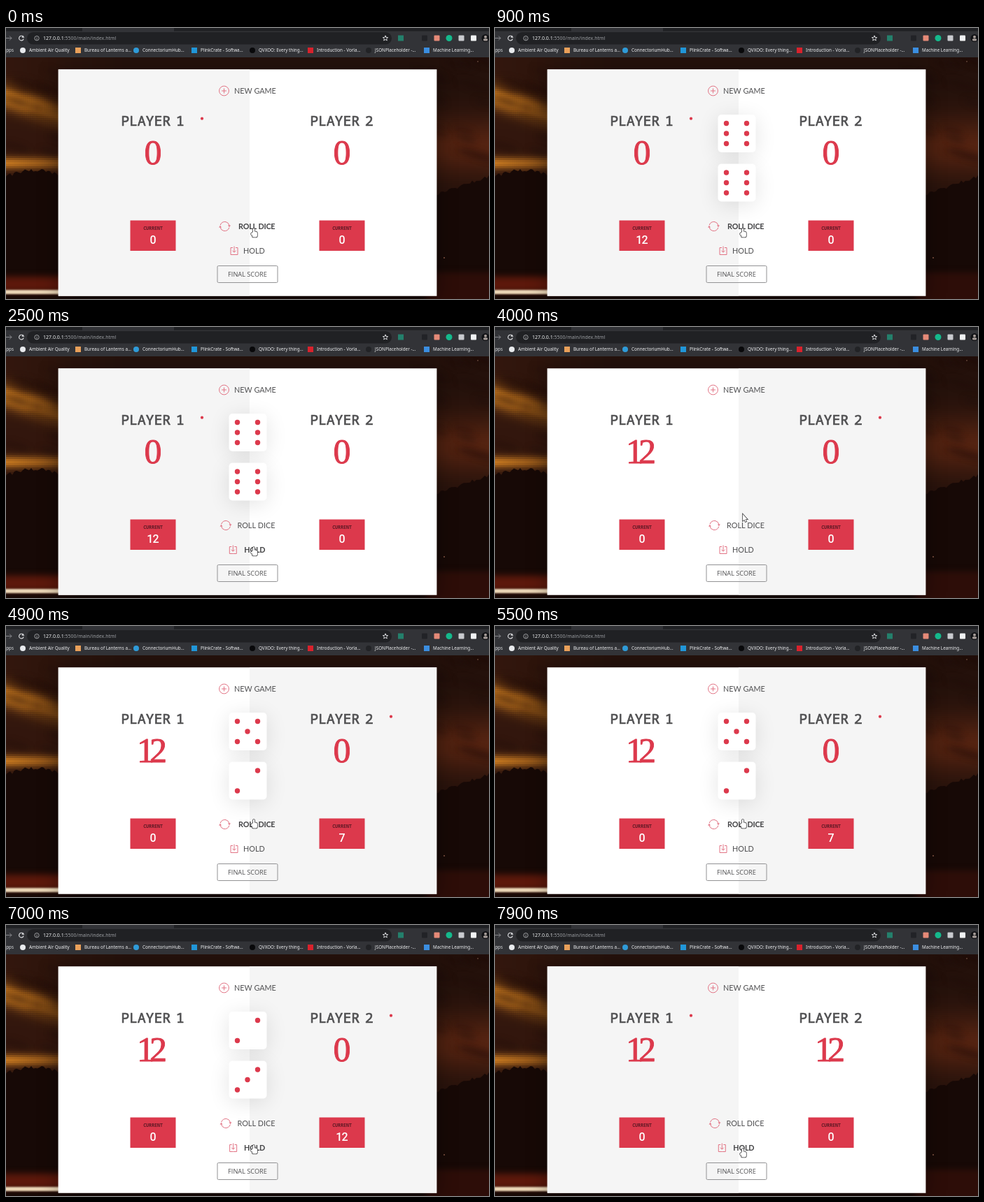
These frames come from a looping animation (690x388 px, 8 s). An HTML page with a canvas:

```html
<!DOCTYPE html>
<html lang="en">
<head>
<meta charset="utf-8">
<title>Dice game</title>
<style>
html, body { margin: 0; width: 100%; height: 100%; overflow: hidden; background: #140706; }
canvas { display: block; width: 690px; height: 388px; }
</style>
</head>
<body>
<canvas id="stage" width="690" height="388"></canvas>
<script>
const W = 690, H = 388, LOOP = 8000;
const RED = '#dc394c', TINT = '#e27384', INK = '#505052', PALE = '#dfe0e3';
const SANS = '"Noto Sans", "Open Sans", sans-serif';
const MONO = '"Noto Sans Mono", "DejaVu Sans Mono", monospace';
const stage = document.getElementById('stage').getContext('2d');
let c = stage;

function text(s, x, y, font, color, align = 'left', spacing = 0) {
  c.font = font;
  c.fillStyle = color;
  c.textAlign = align;
  c.letterSpacing = spacing + 'px';
  c.fillText(s, x + (align === 'center' ? spacing / 2 : 0), y);
}
// Centred text made heavier by an outline
function heavyText(s, x, y, font, color, weight, spacing) {
  text(s, x, y, font, color, 'center', spacing);
  c.strokeStyle = color;
  c.lineWidth = weight;
  c.lineJoin = 'round';
  c.strokeText(s, x + spacing / 2, y);
  c.lineJoin = 'miter';
}
function rect(x, y, w, h, color, r = 0) {
  c.fillStyle = color;
  c.beginPath();
  c.roundRect(x, y, w, h, r);
  c.fill();
}
function disc(x, y, r, color) {
  c.fillStyle = color;
  c.beginPath();
  c.arc(x, y, r, 0, 7);
  c.fill();
}
function line(points, color, width = 1) {
  c.strokeStyle = color;
  c.lineWidth = width;
  c.beginPath();
  points.forEach(([x, y]) => c.lineTo(x, y));
  c.stroke();
}
function arc(x, y, r, from, to, color, width = 1) {
  c.strokeStyle = color;
  c.lineWidth = width;
  c.beginPath();
  c.arc(x, y, r, from, to);
  c.stroke();
}
function triangle(x, y, w, h, color) {
  c.fillStyle = color;
  c.beginPath();
  c.moveTo(x - w, y);
  c.lineTo(x + w, y);
  c.lineTo(x, y + h);
  c.fill();
}
function blurred(px, paint) {
  c.save();
  c.filter = `blur(${px}px)`;
  paint();
  c.restore();
}
function shadowed(alpha, blur, paint) {
  c.save();
  c.shadowColor = `rgba(0,0,0,${alpha})`;
  c.shadowBlur = blur;
  c.shadowOffsetY = 5;
  paint();
  c.restore();
}
function seeded(n) {
  return () => (n = (n * 16807) % 2147483647) / 2147483647;
}
const bump = (v, mid, width) => Math.exp(-(((v - mid) / width) ** 2));

// Sunset: amber bands on the left fading to a dull red glow on the right
function skyColor(x, y) {
  const near = Math.max(0, 1 - x / 170), far = x / W;
  const amber = near * (bump(y, 97 + x * 0.35, 17) + 0.9 * bump(y, 192, 9));
  const glow = 0.3 * near + far * bump(y, 168, 42);
  const mix = [36, 17, 11].map((v, k) => v + [158, 104, 20][k] * amber + [48, 18, 6][k] * glow);
  return `rgb(${mix.map(Math.round)})`;
}
function scenery() {
  const rnd = seeded(41);
  for (let x = 0; x < W; x += 3) {
    for (let y = 42; y < 260; y += 3) {
      c.fillStyle = skyColor(x, y);
      c.fillRect(x, y, 3, 3);
    }
  }
  blurred(4, () => {
    for (let i = 0; i < 30; i++) {
      c.fillStyle = 'rgba(28,12,9,.32)';
      c.beginPath();
      c.ellipse((i % 2) * 610 + rnd() * 80, 45 + rnd() * 140, 10 + rnd() * 22, 2 + rnd() * 4, 0.3, 0, 7);
      c.fill();
    }
  });
  c.fillStyle = '#170906';
  c.beginPath();
  c.moveTo(0, H);
  for (let x = 0; x <= W; x += 3) {
    const ridge = x < 345 ? 206 + 5 * Math.cos((x - 40) / 18 + 3.1) : 236 - (x - 615) * 0.35;
    c.lineTo(x, ridge + rnd() * 5);
  }
  c.lineTo(W, H);
  c.fill();
  // Light trails on the road
  blurred(5, () => rect(-10, 356, 110, 22, 'rgba(140,35,15,.6)'));
  blurred(1, () => rect(-5, 375, 85, 6, '#edd8b8'));
  blurred(4, () => rect(600, 350, 100, 45, 'rgba(60,18,10,.6)'));
  disc(626, 329, 1, '#8b5a48');
  disc(674, 48, 0.8, '#8b6a58');
}

const marks = [
  ['#e8eaed', 'Ambient Air Quality'],
  ['#e9a05a', 'Bureau of Lanterns a...'],
  ['#2f9bd8', 'ConnectoriumHub...'],
  ['#2196d8', 'PlinkCrate - Softwa...'],
  ['#08080a', 'QVXOO: Every thing...'],
  ['#d8222c', 'Introduction - Vorla...'],
  ['#222326', 'JSONPlaceholder -...'],
  ['#3b8ee0', 'Machine Learning...']
];
const extensions = ['#222327', '#e58a78', '#15b98c', '#c9cbcf', '#f1f3f4'];

function browser() {
  rect(0, 0, W, 42, '#323337');
  rect(0, 0, W, 4.5, '#1f2023');
  rect(109, 0, 131, 5, '#323337');
  rect(30, 6, 521, 17.5, '#202124', 9);
  line([[0, 14.5], [8, 14.5]], '#85868a');
  line([[5, 11.5], [8, 14.5], [5, 17.5]], '#85868a');
  arc(22, 14.5, 3.3, 0.3, 5.5, PALE, 1.1);
  triangle(24.3, 13.8, 2, -3, PALE);
  arc(44, 14.7, 3.2, 0, 7, '#b9babd', 0.8);
  text('i', 44, 17, '6px ' + SANS, PALE, 'center');
  text('127.0.0.1', 53, 17.2, '7px ' + SANS, '#f1f3f4');
  const host = c.measureText('127.0.0.1').width;
  text(':5500/main/index.html', 53 + host, 17.2, '7px ' + SANS, '#9a9da1');
  const star = Array.from({ length: 12 }, (_, i) => {
    const a = i * Math.PI / 5 - Math.PI / 2, r = i % 2 ? 1.7 : 3.9;
    return [542 + r * Math.cos(a), 14.8 + r * Math.sin(a)];
  });
  line(star, PALE, 0.9);
  rect(560, 10.5, 8, 8, '#24806c');
  extensions.forEach((color, i) => {
    const x = 598 + i * 17.5;
    if (i === 2) disc(x, 14.5, 4.5, color);
    else rect(x - 4, 10.5, 8, 8, color, 1);
  });
  disc(685, 14.5, 5.5, '#111215');
  disc(685, 12.8, 2, '#a69c98');
  rect(681.8, 15.2, 6.4, 3.3, '#a69c98', 2);
  text('Apps', 11, 34.3, '6.3px ' + SANS, PALE, 'right');
  marks.forEach(([color, name], i) => {
    const x = Math.max(24, 20 + 83 * i);
    if (i % 2) rect(x - 4, 28, 8, 8, color);
    else disc(x, 32, 4, color);
    text(name, x + 9, 34.3, '6.3px ' + SANS, '#eeeff1');
  });
}

const backdrop = document.createElement('canvas');
backdrop.width = W;
backdrop.height = H;
c = backdrop.getContext('2d');
scenery();
shadowed(0.4, 28, () => rect(74.6, 59.2, 540.8, 324.6, '#fff'));
browser();
c = stage;

// Game: a click rolls two dice, or holds when no dice are given
const clicks = [
  { at: 500, dice: [6, 6] },
  { at: 3200 },
  { at: 4900, dice: [5, 2] },
  { at: 6100, dice: [2, 3] },
  { at: 7500 }
];
function gameAt(t) {
  const g = { turn: 0, scores: [0, 0], current: [0, 0], dice: [] };
  for (const { at, dice } of clicks) {
    if (at > t) break;
    if (dice) {
      g.dice = dice;
      g.current[g.turn] += dice[0] + dice[1];
    } else {
      g.scores[g.turn] += g.current[g.turn];
      g.current = [0, 0];
      g.dice = [];
      g.turn = 1 - g.turn;
    }
  }
  return g;
}

const moves = [
  { from: 1400, to: 2000, y: 315 },
  { from: 3500, to: 3950, y: 268 },
  { from: 4100, to: 4450, y: 277 },
  { from: 6300, to: 6900, y: 315 },
  { from: 7200, to: 7700, y: 320 }
];
function pointerY(t) {
  return moves.reduce((y, m) => {
    const u = Math.min(1, Math.max(0, (t - m.from) / (m.to - m.from)));
    return y + (m.y - y) * u * u * (3 - 2 * u);
  }, 287);
}
const zones = { roll: [276, 294], hold: [311, 327] };
function over(name, t) {
  const y = pointerY(t);
  return y >= zones[name][0] && y <= zones[name][1];
}
// Share of the last 300 ms spent over a button
function hover(name, t) {
  let n = 0;
  for (let i = 0; i < 15; i++) n += over(name, t - i * 20);
  return n / 15;
}

function player(i, game) {
  const x = 210 + i * 270, score = String(game.scores[i]), wide = score.length > 1;
  c.wordSpacing = '-4px';
  heavyText('PLAYER ' + (i + 1), x - 0.5, 140, '500 20px ' + MONO, INK, 0.7, -0.2);
  c.wordSpacing = '0px';
  if (game.turn === i) disc(x + 70, 129.7, 2.1, RED);
  heavyText(score, x - (wide ? 1.5 : 0), 195.3, '50px "Liberation Serif", serif', RED, 0.9, wide ? -7 : 0);
  rect(x - 32.5, 275.5, 65, 43.5, RED);
  text('CURRENT', x, 289.2, '600 6.6px ' + MONO, '#5f1925', 'center');
  text(game.current[i], x, 308.8, '500 16px Roboto, "Open Sans", sans-serif', '#fff', 'center', -0.8);
}
function die(n, y) {
  shadowed(0.11, 30, () => rect(318.5, y - 27, 54, 54, '#fff', 5));
  const pip = (dx, dy) => disc(345 + dx * 14.5, y + dy * 14.5, 3.7, RED);
  if (n % 2) pip(0, 0);
  if (n > 1) { pip(1, -1); pip(-1, 1); }
  if (n > 3) { pip(-1, -1); pip(1, 1); }
  if (n === 6) { pip(-1, 0); pip(1, 0); }
}
function label(s, x, y, on) {
  text(s, x, y, (on ? '700' : '400') + ' 10.8px Lato, "Open Sans", sans-serif', on ? '#444446' : INK, 'left', on ? -0.2 : 0);
}
function buttons(t) {
  arc(311.5, 90, 6.9, 0, 7, TINT);
  line([[308, 90], [315, 90]], TINT);
  line([[311.5, 86.5], [311.5, 93.5]], TINT);
  label('NEW GAME', 326, 94.2, false);

  const r = hover('roll', t), x = 314 - 1.5 * r;
  for (const side of [-1, 1]) {
    const a = side < 0 ? Math.PI : 0;
    arc(x, 284, 6.6, a + 0.25, a + 2.95, TINT);
    triangle(x + side * 6.5, 284 - side * 1.5, 2, side * 2.6, TINT);
  }
  label('ROLL DICE', 330.5 + 1.5 * r, 288.1, over('roll', t));

  const h = hover('hold', t), hx = 326 - 1.7 * h;
  for (const s of [-1, 1]) {
    line([[hx + s * 2, 314.5], [hx + s * 5, 314.5], [hx + s * 5, 324.5], [hx, 324.5]], TINT);
    line([[hx + s * 2.5, 318.7], [hx, 321.2]], TINT);
  }
  line([[hx, 312.5], [hx, 321]], TINT);
  label('HOLD', 339 + 1.3 * h, 322.9, over('hold', t));

  c.strokeStyle = '#929294';
  c.lineWidth = 1;
  c.beginPath();
  c.roundRect(302, 340.5, 86, 24, 1.5);
  c.stroke();
  text('FINAL SCORE', 345, 356, '9.2px "Open Sans", "Noto Sans", sans-serif', INK, 'center');
}

const hand = new Path2D();
hand.roundRect(-1.1, 0, 2.2, 9, 1.1);
hand.roundRect(-2.3, 4.4, 7.2, 8.2, 2.2);
hand.roundRect(-4, 6.6, 4, 2.6, 1.2);
const arrow = new Path2D('M0 0V9.6L2.2 7.7L3.7 11L5.1 10.3L3.7 7.2H6.5Z');

function cursor(t) {
  c.save();
  c.translate(354, pointerY(t));
  const path = over('roll', t) || over('hold', t) ? hand : arrow;
  c.strokeStyle = '#38383a';
  c.lineWidth = 1.5;
  c.stroke(path);
  c.fillStyle = '#fff';
  c.fill(path);
  c.restore();
}

function draw(t) {
  const game = gameAt(t);
  c.drawImage(backdrop, 0, 0);
  rect(game.turn ? 348 : 75, 59.5, game.turn ? 267 : 273, 324, '#f5f5f5');
  player(0, game);
  player(1, game);
  game.dice.forEach((n, i) => die(n, 151 + i * 70.5));
  buttons(t);
  cursor(t);
}

const start = performance.now();
function tick(now) {
  draw(Math.max(0, now - start) % LOOP);
  requestAnimationFrame(tick);
}
draw(0);
requestAnimationFrame(tick);
</script>
</body>
</html>
```
